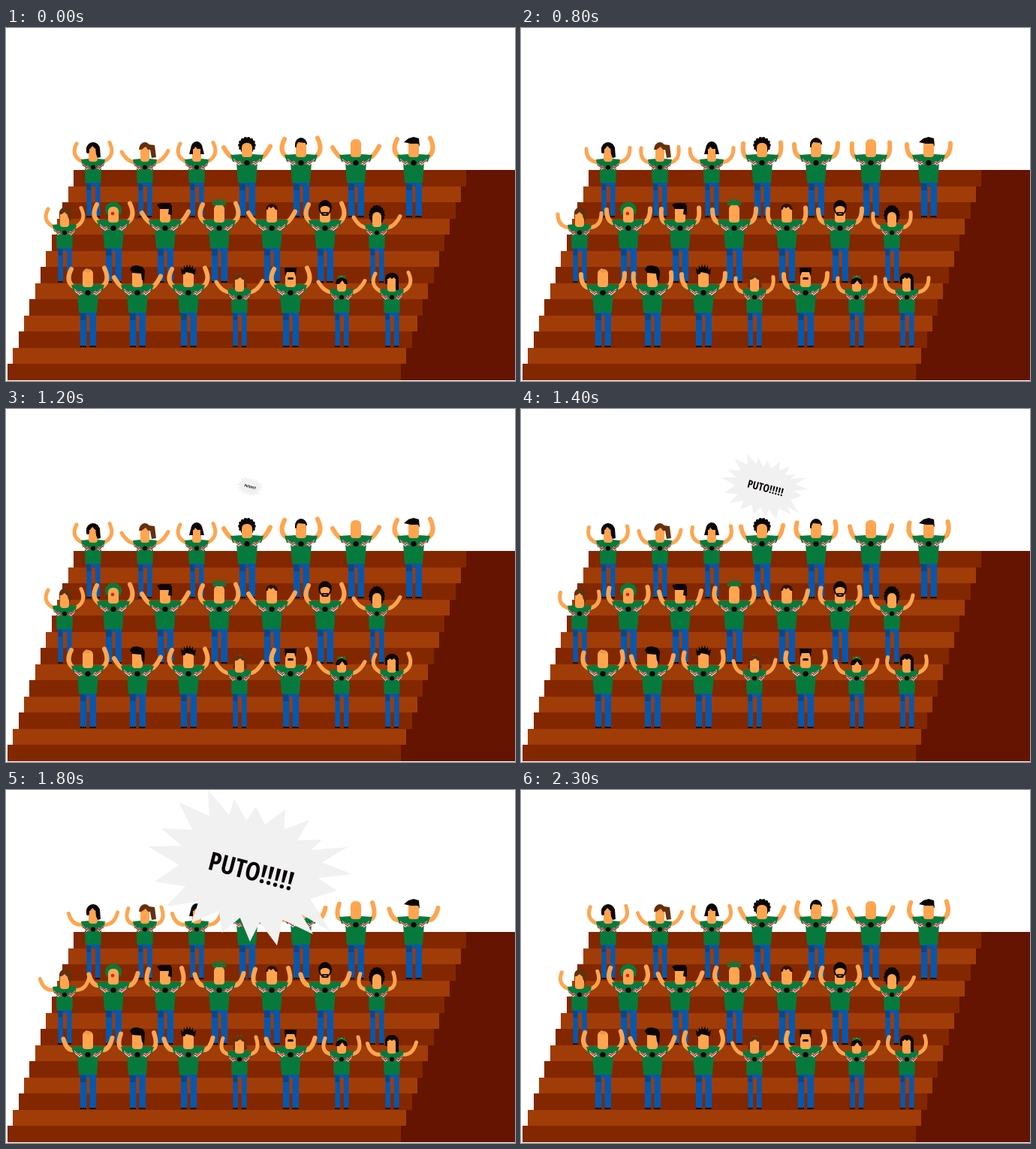
Write an HTML page with a canvas that moves like this. It is 678 px wide and 470 px high and loops after 2400 ms.

```html
<!DOCTYPE html>
<html lang="es">
<head>
<meta charset="utf-8">
<style>
html, body { margin: 0; width: 100%; height: 100%; overflow: hidden; background: #fff; }
canvas { display: block; }
</style>
</head>
<body>
<canvas id="stage" width="678" height="470"></canvas>
<script>
const ctx = document.getElementById('stage').getContext('2d');
const LOOP = 2400, STEP = 100;
const SKIN = '#ffa54f', GREEN = '#067a3c', BLUE = '#0558ae', BLACK = '#0b0606', BROWN = '#63300f';

function box(color, x, y, w, h) {
  ctx.fillStyle = color;
  ctx.fillRect(x, y, w, h);
}
function blob(color, x, y, rx, ry = rx) {
  ctx.fillStyle = color;
  ctx.beginPath();
  ctx.ellipse(x, y, rx, ry, 0, 0, Math.PI * 2);
  ctx.fill();
}
function poly(color, ...p) {
  ctx.fillStyle = color;
  ctx.beginPath();
  for (let i = 0; i < p.length; i += 2) ctx.lineTo(p[i], p[i + 1]);
  ctx.closePath();
  ctx.fill();
}
function pill(color, x, y, w, h, r) {
  ctx.fillStyle = color;
  ctx.beginPath();
  ctx.roundRect(x, y, w, h, r);
  ctx.fill();
}
// Rounded top of the hair, flat underneath
function cap(color, rx, top, bottom) {
  ctx.fillStyle = color;
  ctx.beginPath();
  ctx.ellipse(0, bottom, rx, bottom - top, 0, Math.PI, Math.PI * 2);
  ctx.fill();
}
function curls(color, y, rx, ry, n) {
  blob(color, 0, y, rx, ry);
  for (let i = 0; i < n; i++) {
    const a = i / n * Math.PI * 2;
    blob(color, Math.cos(a) * rx, y + Math.sin(a) * ry, 2.3);
  }
}
function spikes(color, n, w, base, height) {
  for (let i = 0; i < n; i++) {
    const k = i / (n - 1) * 2 - 1;
    poly(color, k * w * .6 - 3, base, k * w, base - height * (1 - .4 * k * k), k * w * .6 + 3, base);
  }
}

// back: drawn behind the face, front: drawn over it
const hair = {
  bald: {},
  long: { front() {
    cap(BLACK, 9, -22, -13);
    pill(BLACK, -9, -15, 4, 8, 2);
    poly(BLACK, 3, -15, 9, -15, 10, -2, 6, -1, 4, -6);
    poly(SKIN, -5, -12, -1, -17, 4, -12);
  } },
  pony: { front() {
    cap(BROWN, 8, -22, -12);
    poly(SKIN, -6, -11, 1, -16, 5, -11);
    poly(BROWN, 5, -19, 13, -18, 15, -2, 9, -1, 7, -12);
  } },
  flip: { front() {
    cap(BLACK, 8, -23, -13);
    poly(BLACK, -8, -14, -5, -14, -5, -6, -10, -6);
    poly(BLACK, 8, -14, 5, -14, 5, -6, 10, -6);
    poly(SKIN, -4, -12, -2, -16, 1, -13);
  } },
  afro: { back() { curls(BLACK, -12, 9.5, 9, 14); }, low: 5 },
  short: { front() {
    cap(BLACK, 8, -22, -13);
    pill(BLACK, -8, -14, 2, 5, 1);
    poly(SKIN, -6, -12, -4, -16, 6, -15, 6, -12);
  } },
  quiff: { front() {
    poly(BLACK, -13, -16, -7, -21, 0, -23, 7, -21, 8, -10, 6, -14, -4, -14);
  } },
  bob: {
    back() { pill(BROWN, -7, -22, 16, 20, 7); },
    front() { cap(BROWN, 7, -22, -13); poly(BROWN, 3, -15, 8, -15, 8, -4, 5, -8); poly(SKIN, -5, -12, 0, -16, 4, -12); }
  },
  clown: {
    back() { curls(GREEN, -13, 9, 8.5, 14); },
    front() { blob('#e3181e', -1, -8, 2.3); },
    low: 3
  },
  rocker: { front() {
    poly(BLACK, -11, -20, -6, -22, 7, -22, 9, -18, 9, -6, 4, -7, 5, -14, -7, -14);
  } },
  punk: { front() { spikes(GREEN, 5, 10, -19, 11); } },
  crop: { front() {
    cap('#2c1208', 8, -21, -13);
    poly(SKIN, -6, -12, -4, -17, -1, -15, 2, -17, 6, -12);
  } },
  beard: {
    back() { blob(BLACK, 0, -16, 9, 10); },
    front() {
      ctx.strokeStyle = BLACK;
      ctx.lineWidth = 1.7;
      ctx.beginPath();
      ctx.arc(0, -13, 7, 0, Math.PI);
      ctx.stroke();
      ctx.strokeRect(-3.5, -9, 7, 3);
    },
    low: 2
  },
  curly: { back() { curls(BLACK, -12, 8.5, 11, 16); }, low: 4 },
  fair: { front() { poly('#e99a48', -6, -17, -2, -21, 5, -18, 1, -15); } },
  swoop: { front() {
    poly(BLACK, -10, -20, -7, -24, -1, -25, 7, -23, 10, -18, 9, -2, 6, -6, 5, -14, -7, -15);
  } },
  spiky: { front() {
    spikes(BLACK, 6, 10, -14, 13);
    cap(BLACK, 9, -23, -13);
    poly(SKIN, -6, -12, -3, -16, 6, -14, 6, -12);
  } },
  wavy: {
    back() { pill(BROWN, -7, -20, 15, 16, 6); blob(BROWN, -6, -4, 3); blob(BROWN, 7, -4, 3); },
    front() { cap(BROWN, 7, -20, -12); poly(SKIN, -5, -11, 1, -15, 5, -11); }
  },
  flat: { front() {
    poly(BLACK, -8, -22, 8, -22, 7, -10, 5, -16, -5, -16, -7, -10);
    pill(BLACK, -4, -9, 8, 3, 1.5);
  } },
  bow: { front() {
    cap(BLACK, 8, -16, -6);
    poly(SKIN, -4, -5, 1, -11, 5, -5);
    poly(GREEN, -5, -18, 0, -16, 5, -18, 5, -13, 0, -15, -5, -13);
  }, low: 3 },
  straight: { front() {
    cap(BLACK, 9, -21, -13);
    pill(BLACK, -9, -15, 3, 9, 1);
    pill(BLACK, 5, -15, 4, 17, 1);
    poly(SKIN, -5, -12, -3, -15, 0, -13, 3, -15, 5, -12);
  } }
};

// Control point and hand of the left arm: start, and two thirds of the swing
const swing = {
  in: [[-31, -3, -22, -20], [-29, 4, -29, -13]],
  out: [[-23, 5, -31, -9], [-27, 4, -25, -14]]
};
const build = {
  man: { sleeve: 22, cuff: 19, pit: 14, hem: 12, long: 38, foot: 82, leg: 8.5, face: 7, arm: 6, root: 17, zig: 18 },
  woman: { sleeve: 16, cuff: 14, pit: 11, hem: 10.5, long: 32, foot: 76, leg: 6.5, face: 6, arm: 5, root: 12, zig: 14 }
};

// x, build, arm swing, hair
const rows = [
  { man: 168, woman: 174, people: [
    [116, 'woman', 'in', 'long'], [185, 'woman', 'out', 'pony'], [254, 'woman', 'in', 'flip'],
    [321, 'man', 'out', 'afro'], [393, 'man', 'in', 'short'], [466, 'man', 'out', 'bald'], [543, 'man', 'in', 'quiff']] },
  { man: 255, woman: 261, people: [
    [78, 'woman', 'in', 'bob'], [143, 'man', 'in', 'clown'], [212, 'man', 'out', 'rocker'],
    [284, 'man', 'in', 'punk'], [354, 'man', 'out', 'crop'], [425, 'man', 'in', 'beard'], [494, 'woman', 'out', 'curly']] },
  { man: 341, woman: 347, people: [
    [109, 'man', 'in', 'fair'], [175, 'man', 'out', 'swoop'], [243, 'man', 'in', 'spiky'],
    [311, 'woman', 'out', 'wavy'], [379, 'man', 'in', 'flat'], [447, 'woman', 'out', 'bow'], [514, 'woman', 'in', 'straight']] }
];

function arm(side, b, pose, u) {
  const [cx, cy, hx, hy] = pose[0].map((v, i) => v + (pose[1][i] - v) * u);
  ctx.strokeStyle = SKIN;
  ctx.lineWidth = b.arm;
  ctx.lineCap = 'round';
  ctx.beginPath();
  ctx.moveTo(side * -b.root, 5);
  ctx.quadraticCurveTo(side * cx, cy, side * hx, hy - (side < 0 ? 1.5 : 0));
  ctx.stroke();
}

function bolt(side, z) {
  const s = side * z;
  poly('#fff', s * .25, 14, s * .55, 9, s * .65, 11, s, 6, s * .95, 10, s * .6, 15, s * .5, 13);
  ctx.strokeStyle = '#d8202a';
  ctx.lineWidth = 1.3;
  ctx.beginPath();
  ctx.moveTo(s * .3, 13.5);
  ctx.lineTo(s * .55, 10.5);
  ctx.lineTo(s * .6, 13);
  ctx.lineTo(s * .95, 8);
  ctx.stroke();
}

function person(x, y, kind, move, style, u) {
  const b = build[kind], h = hair[style], w = b.leg;
  ctx.save();
  ctx.translate(x, y);
  for (const side of [1, -1]) arm(side, b, swing[move], u);

  const left = -b.hem + 2, right = b.hem - w - 1;
  for (const lx of [left, right]) {
    box(BLUE, lx, b.long, w, b.foot - b.long);
    for (let i = 0; i < 3; i++) box(BLACK, lx + i * w / 3, b.foot, w / 3 - .6, 2);
  }
  box(BLUE, left, b.long, right - left, 4);
  box('#06478c', left, b.long + 1, w - 1, 9);

  poly(GREEN, -b.sleeve, 1, -b.face, 0, b.face, 0, b.sleeve, 1, b.cuff, 10, b.pit, 11,
    b.hem, b.long, -b.hem, b.long, -b.pit, 11, -b.cuff, 10);
  bolt(-1, b.zig);
  bolt(1, b.zig);
  blob(BLACK, 0, 11.5, kind === 'man' ? 3.6 : 3);

  if (h.back) h.back();
  const top = -20 + (h.low || 0);
  pill(SKIN, -b.face, top, b.face * 2, 4 - top, [6, 6, 4, 4]);
  if (h.front) h.front();
  ctx.restore();
}

function stand() {
  for (let i = 0; i < 13; i++) {
    const y = Math.round(189 + i * 21.5), next = Math.min(469, Math.round(210.5 + i * 21.5));
    const x = Math.round(90 - i * 7.33), end = Math.round(613 - i * 7.25);
    box('#641400', end, y, 678 - end, next - y);
    box(i % 2 ? '#a03c08' : '#822700', x, y, end - x, next - y);
  }
}

// Burst tips around the centre
const tips = [[-56, -103], [-21, -91], [8, -81], [47, -77], [79, -63], [96, -37], [130, -27], [136, 9],
  [116, 31], [107, 85], [84, 89], [36, 104], [0, 99], [-37, 87], [-78, 74], [-112, 52], [-127, 19],
  [-136, -28], [-118, -52], [-95, -87]];

function bubble(size) {
  ctx.save();
  ctx.translate(325, 103);
  ctx.scale(size, size);
  const edge = tips.flatMap(([x, y], i) => {
    const [nx, ny] = tips[(i + 1) % tips.length];
    return [x, y, (x + nx) * .36, (y + ny) * .36];
  });
  poly('#f1f1f1', ...edge);
  ctx.translate(2, 5);
  ctx.rotate(.25);
  const text = 'PUTO!!!!!';
  const face = px => 'bold ' + px + 'px "Open Sans Condensed", "Roboto Condensed", "Noto Sans ExtraCondensed", "Open Sans", sans-serif';
  ctx.fontStretch = 'extra-condensed';
  ctx.font = face(43);
  ctx.font = face(Math.min(43, 43 * 116 / ctx.measureText(text).width));
  ctx.textAlign = 'center';
  ctx.textBaseline = 'alphabetic';
  const m = ctx.measureText('PUTO');
  ctx.fillStyle = BLACK;
  ctx.fillText(text, 0, m.actualBoundingBoxAscent / 2);
  ctx.restore();
}

function draw(t) {
  ctx.clearRect(0, 0, 678, 470);
  stand();
  const u = 1.5 * (1 - Math.abs(t / 600 % 2 - 1));
  for (const row of rows)
    for (const [x, kind, move, style] of row.people) person(x, row[kind], kind, move, style, u);
  if (t >= 1200 && t < 2200) bubble(Math.min(1, .135 + (t - 1200) / 600 * .865));
}

const start = performance.now();
function frame() {
  const t = (performance.now() - start) % LOOP;
  draw(Math.floor(t / STEP) * STEP);
  requestAnimationFrame(frame);
}
frame();
</script>
</body>
</html>
```
